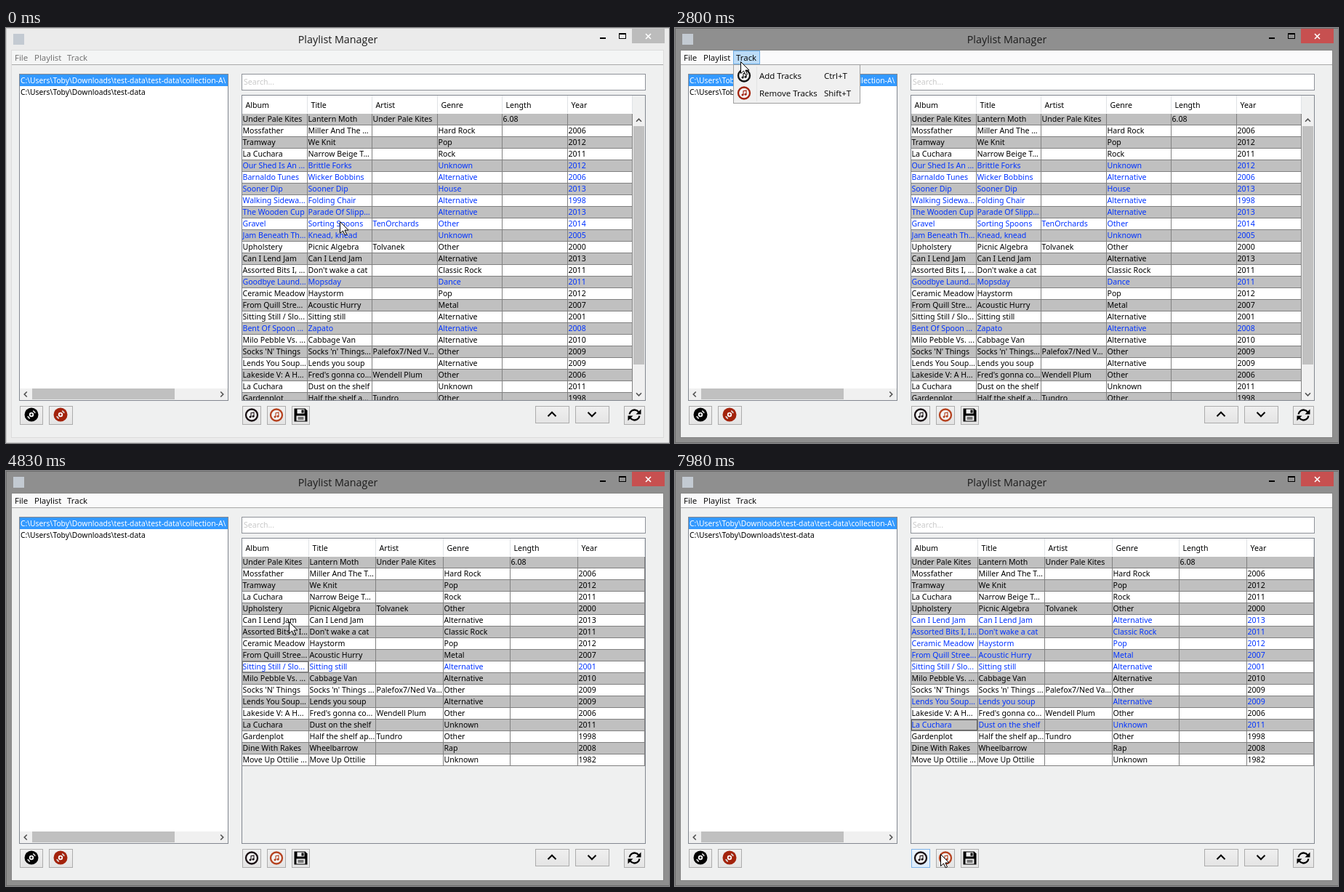
These frames come from a looping animation (912 by 571 pixels, 8 s). An HTML page with a canvas:

```html
<!DOCTYPE html>
<html lang="en">
<head>
<meta charset="utf-8">
<title>Playlist Manager</title>
<style>
  html, body { margin: 0; width: 100%; height: 100%; overflow: hidden; background: #ebebeb; }
  canvas { display: block; }
</style>
</head>
<body>
<canvas id="stage" width="912" height="571"></canvas>
<script>
const ctx = document.getElementById('stage').getContext('2d');
const LOOP = 8000, STEP = 70;
const SMALL = '10.6px "Noto Sans", sans-serif';
const PATH = '10.3px "Noto Sans", sans-serif';
const MENU = '11.5px "Open Sans", sans-serif';
const TITLE = '14.3px "Open Sans", sans-serif';
const BLUE = '#0033ff', RED = '#a3230c', ORANGE = '#b5421f', EDGE = '#828790', THUMB = '#c0c0c0';

const HEADERS = ['Album', 'Title', 'Artist', 'Genre', 'Length', 'Year'];
// A leading * marks tracks that are selected at first and then removed.
const TRACKS = `Under Pale Kites|Lantern Moth|Under Pale Kites||6.08|
Mossfather|Miller And The Tin Gate||Hard Rock||2006
Tramway|We Knit||Pop||2012
La Cuchara|Narrow Beige Teapots||Rock||2011
*Our Shed Is An Orchard|Brittle Forks||Unknown||2012
*Barnaldo Tunes|Wicker Bobbins||Alternative||2006
*Sooner Dip|Sooner Dip||House||2013
*Walking Sideways Home|Folding Chair||Alternative||1998
*The Wooden Cup|Parade Of Slippers||Alternative||2013
*Gravel|Sorting Spoons|TenOrchards|Other||2014
*Jam Beneath The Ladder|Knead, knead||Unknown||2005
Upholstery|Picnic Algebra|Tolvanek|Other||2000
Can I Lend Jam|Can I Lend Jam||Alternative||2013
Assorted Bits I, II and III|Don't wake a cat||Classic Rock||2011
*Goodbye Laundry|Mopsday||Dance||2011
Ceramic Meadow|Haystorm||Pop||2012
From Quill Street To Barn|Acoustic Hurry||Metal||2007
Sitting Still / Slow Waltz|Sitting still||Alternative||2001
*Bent Of Spoon And Fork|Zapato||Alternative||2008
Milo Pebble Vs. The Moat|Cabbage Van||Alternative||2010
Socks 'N' Things|Socks 'n' Things (Edit)|Palefox7/Ned Varrow|Other||2009
Lends You Soup (Single)|Lends you soup||Alternative||2009
Lakeside V: A Hundred Oars|Fred's gonna cook again|Wendell Plum|Other||2006
La Cuchara|Dust on the shelf||Unknown||2011
Gardenplot|Half the shelf apart|Tundro|Other||1998
Dine With Rakes|Wheelbarrow||Rap||2008
Move Up Ottilie (Live)|Move Up Ottilie||Unknown||1982`.split('\n').map(line => ({
  marked: line[0] === '*', cells: line.replace('*', '').split('|')
}));
const REMAINING = TRACKS.filter(track => !track.marked);

// Pointer moves: start, end, x, y
const MOVES = [
  [1120, 1960, 168, 146], [1960, 2590, 90, 46], [3010, 3360, 98, 86],
  [3850, 4340, 363, 273], [4620, 4830, 389, 207], [6020, 6440, 389, 322],
  [6580, 6790, 389, 356], [7000, 7420, 36, 505], [7420, 7840, 338, 544],
  [7840, 7980, 365, 527]
];
// Selections after the removal: time, newly selected rows, focused row
const PICKS = [[4480, [9], 9], [5950, [5, 6, 7, 8], 5], [6510, [12], 12], [6860, [14], 14]];

function pointerAt(t) {
  let x = 459, y = 266;
  for (const [start, end, toX, toY] of MOVES) {
    if (t <= start) break;
    const p = Math.min(1, (t - start) / (end - start));
    const eased = (1 - Math.cos(Math.PI * p)) / 2;
    x += (toX - x) * eased;
    y += (toY - y) * eased;
  }
  return [Math.round(x), Math.round(y)];
}

function rect(x, y, w, h, color) {
  ctx.fillStyle = color;
  ctx.fillRect(x, y, w, h);
}

function box(x, y, w, h, fill, border) {
  rect(x, y, w, h, border);
  rect(x + 1, y + 1, w - 2, h - 2, fill);
}

function text(str, x, y, color = '#000', font = SMALL, align = 'left') {
  ctx.font = font;
  ctx.textAlign = align;
  ctx.fillStyle = color;
  ctx.fillText(str, x, y);
}

function line(points, color, width = 1) {
  ctx.beginPath();
  points.forEach(([x, y]) => ctx.lineTo(x, y));
  ctx.strokeStyle = color;
  ctx.lineWidth = width;
  ctx.stroke();
}

function arc(x, y, r, color, width, from = 0, to = 2 * Math.PI) {
  ctx.beginPath();
  ctx.arc(x, y, r, from, to);
  ctx.strokeStyle = color;
  ctx.lineWidth = width;
  ctx.stroke();
}

function disc(x, y, r, color) {
  ctx.beginPath();
  ctx.arc(x, y, r, 0, 2 * Math.PI);
  ctx.fillStyle = color;
  ctx.fill();
}

function polygon(points, color) {
  ctx.beginPath();
  points.forEach(([x, y]) => ctx.lineTo(x, y));
  ctx.closePath();
  ctx.fillStyle = color;
  ctx.fill();
}

function clipped(x, y, w, h, draw) {
  ctx.save();
  ctx.beginPath();
  ctx.rect(x, y, w, h);
  ctx.clip();
  draw();
  ctx.restore();
}

function ellipsize(str, width) {
  ctx.font = SMALL;
  if (ctx.measureText(str).width <= width) return str;
  while (ctx.measureText(str + '...').width > width) str = str.slice(0, -1);
  return str + '...';
}

// Chevron pointing along (dx, dy)
function chevron(x, y, dx, dy, size, color, width) {
  line([[x - dx * size / 2 - dy * size, y - dy * size / 2 - dx * size],
        [x + dx * size / 2, y + dy * size / 2],
        [x - dx * size / 2 + dy * size, y - dy * size / 2 + dx * size]], color, width);
}

function button(x, w, h = 26, hover = false) {
  const fill = ctx.createLinearGradient(0, 520, 0, 520 + h);
  fill.addColorStop(0, hover ? '#ecf4fc' : '#f0f0f0');
  fill.addColorStop(1, hover ? '#dcecfc' : '#e4e4e4');
  box(x, 520, w, h, fill, hover ? '#7eb4ea' : '#acacac');
}

function recordIcon(x, y, color) {
  disc(x, y, 9.5, color);
  arc(x, y, 5.6, '#ddd', 1.6, -1.2, -0.4);
  arc(x, y, 5.6, '#ddd', 1.6, 1.95, 2.75);
  disc(x, y, 3.2, '#fff');
  disc(x, y, 1.4, color);
}

function noteIcon(x, y, color) {
  disc(x, y, 8, '#f4f4f4');
  arc(x, y, 8, color, 2.3);
  disc(x - 2, y + 2.6, 1.5, color);
  disc(x + 2, y + 1.8, 1.5, color);
  line([[x - 1, y + 2.6], [x - 1, y - 2.8], [x + 3, y - 3.6], [x + 3, y + 1.8]], color, 1.1);
}

function saveIcon(x, y) {
  polygon([[x - 9, y - 9], [x + 6, y - 9], [x + 9, y - 6], [x + 9, y + 9], [x - 9, y + 9]], '#000');
  rect(x - 5, y - 8, 10, 6, '#eee');
  rect(x + 1, y - 7, 3, 4, '#000');
  rect(x - 6, y + 1, 12, 7, '#eee');
  rect(x - 4, y + 3, 8, 1, '#000');
  rect(x - 4, y + 5, 8, 1, '#000');
}

function refreshIcon(x, y) {
  arc(x, y, 7, '#000', 2.3, Math.PI * 1.05, Math.PI * 1.8);
  arc(x, y, 7, '#000', 2.3, Math.PI * 0.05, Math.PI * 0.8);
  polygon([[x + 9, y - 8], [x + 9, y - 1], [x + 2, y - 1]], '#000');
  polygon([[x - 9, y + 8], [x - 9, y + 1], [x - 2, y + 1]], '#000');
}

function drawWindow(active) {
  const frameColor = active ? '#8f8f8f' : '#ebebeb';
  rect(0, 0, 912, 571, active ? '#6e6e6e' : '#c9c9c9');
  rect(1, 1, 911, 569, frameColor);
  rect(7, 30, 898, 534, active ? '#858585' : '#dcdcdc');
  rect(8, 31, 896, 532, '#eff0f0');
  rect(10, 8, 15, 15, '#c3cad2');
  text('Playlist Manager', 456.5, 21, '#1c1c1c', TITLE, 'center');
  rect(817, 13, 8, 2, '#000');
  box(843, 7, 10, 8, frameColor, '#000');
  rect(843, 7, 10, 2, '#000');
  rect(861, 1, 45, 20, active ? '#c75050' : '#bcbcbc');
  line([[880, 8], [887, 15]], '#fff', 1.6);
  line([[887, 8], [880, 15]], '#fff', 1.6);
  rect(8, 31, 896, 19, active ? '#fafafb' : '#f4f5f5');
  rect(8, 50, 896, 1, '#a8a8a8');
}

function drawMenuBar(active, open) {
  if (open) box(80, 31, 37, 19, '#bcdcf8', '#6faee4');
  const color = active ? '#000' : '#6d6d6d';
  text('File', 12, 45, color, MENU);
  text('Playlist', 39, 45, color, MENU);
  text('Track', 84, 45, color, MENU);
}

function drawList() {
  box(18, 63, 288, 450, '#fff', EDGE);
  rect(19, 64, 286, 16, '#3399ff');
  clipped(19, 64, 286, 40, () => {
    const path = 'C:\\Users\\Toby\\Downloads\\test-data';
    text(path + '\\test-data\\collection-A\\', 20, 76, '#fff', PATH);
    text(path, 20, 92, '#000', PATH);
  });
  rect(19, 496, 286, 16, '#f0f0f0');
  rect(36, 496, 196, 15, THUMB);
  chevron(27, 504, -1, 0, 3.5, '#505050', 1.6);
  chevron(297, 504, 1, 0, 3.5, '#505050', 1.6);
}

function drawTable(t) {
  const removed = t >= 3780;
  const picks = PICKS.filter(pick => t >= pick[0]);
  const picked = new Set(picks.flatMap(pick => pick[1]));
  const focus = picks.length ? picks[picks.length - 1][2] : -1;
  const rows = removed ? REMAINING : TRACKS;
  const edge = k => removed ? Math.floor(324 + 92.4 * k) : Math.floor(324.5 + 89.5 * k);
  const right = removed ? 879 : 862;

  box(324, 63, 556, 23, '#fff', '#8e9299');
  text('Search...', 327, 78, '#c9c9c9');
  box(324, 92, 556, 421, '#eff0f0', EDGE);
  rect(325, 93, right - 325, 25, '#fff');
  HEADERS.forEach((name, k) => {
    text(name, edge(k) + 5.5, 110);
    rect(edge(k + 1), 93, 1, 24, '#dfe2e5');
  });

  clipped(325, 118, 554, 394, () => rows.forEach((track, i) => {
    const y = 118 + 16 * i;
    const blue = removed ? picked.has(i) : track.marked;
    rect(325, y, right - 325, 15, i % 2 ? '#fff' : '#c0c0c0');
    rect(325, y + 15, right - 325, 1, '#808080');
    track.cells.forEach((cell, k) => {
      const x = edge(k) + 1;
      text(ellipsize(cell, edge(k + 1) - x - 1), x + 0.5, y + 11, blue ? BLUE : '#000');
      rect(edge(k + 1), y, 1, 16, '#808080');
    });
    if (removed && i === focus) {
      ctx.setLineDash([1, 1]);
      ctx.strokeStyle = '#000';
      ctx.lineWidth = 1;
      ctx.strokeRect(325.5, y + 0.5, edge(1) - 326, 14);
      ctx.setLineDash([]);
    }
  }));

  if (!removed) {
    rect(862, 118, 17, 394, '#f0f0f0');
    rect(863, 135, 15, 328, THUMB);
    chevron(870.5, 127, 0, -1, 3.5, '#505050', 1.6);
    chevron(870.5, 504, 0, 1, 3.5, '#505050', 1.6);
  }
}

function drawButtons(t) {
  button(19, 32);
  button(59, 33);
  button(325, 26, 26, t >= 7910);
  button(359, 26);
  button(393, 25);
  button(728, 47, 24);
  button(783, 47, 24);
  button(850, 29);
  recordIcon(35, 532, '#000');
  recordIcon(75, 532, RED);
  noteIcon(338, 532.5, '#1a1014');
  noteIcon(372, 532.5, ORANGE);
  saveIcon(405.5, 532.5);
  chevron(751, 531.5, 0, -1, 5.5, '#000', 2);
  chevron(806, 531.5, 0, 1, 5.5, '#000', 2);
  refreshIcon(864.5, 532.5);
}

function drawMenu(pointerY) {
  box(80, 50, 175, 54, '#f0f0f0', '#a0a0a0');
  rect(112, 53, 1, 48, '#e2e3e3');
  if (pointerY >= 54) box(83, pointerY < 78 ? 54 : 78, 169, 23, '#d1e5f7', '#78aee5');
  noteIcon(95, 65.5, '#111');
  noteIcon(95, 89.5, RED);
  text('Add Tracks', 116, 70, '#000', MENU);
  text('Ctrl+T', 205, 70, '#000', MENU);
  text('Remove Tracks', 116, 94, '#000', MENU);
  text('Shift+T', 205, 94, '#000', MENU);
}

function drawPointer(x, y) {
  const shape = [[0, 0], [0, 16], [4, 12.5], [6.7, 18.3], [9, 17.3], [6.4, 11.6], [11.5, 11.6]]
    .map(([dx, dy]) => [x + 0.5 + dx, y + 0.5 + dy]);
  polygon(shape, '#fff');
  line([...shape, shape[0]], '#000');
}

function draw(t) {
  const active = t >= 2660;
  const open = t >= 2730 && t < 3780;
  const [x, y] = pointerAt(t);
  drawWindow(active);
  drawMenuBar(active, open);
  drawList();
  drawTable(t);
  drawButtons(t);
  if (open) drawMenu(y);
  drawPointer(x, y);
}

function frame() {
  const t = performance.now() % LOOP;
  draw(Math.floor(t / STEP) * STEP);
  requestAnimationFrame(frame);
}
frame();
</script>
</body>
</html>
```
